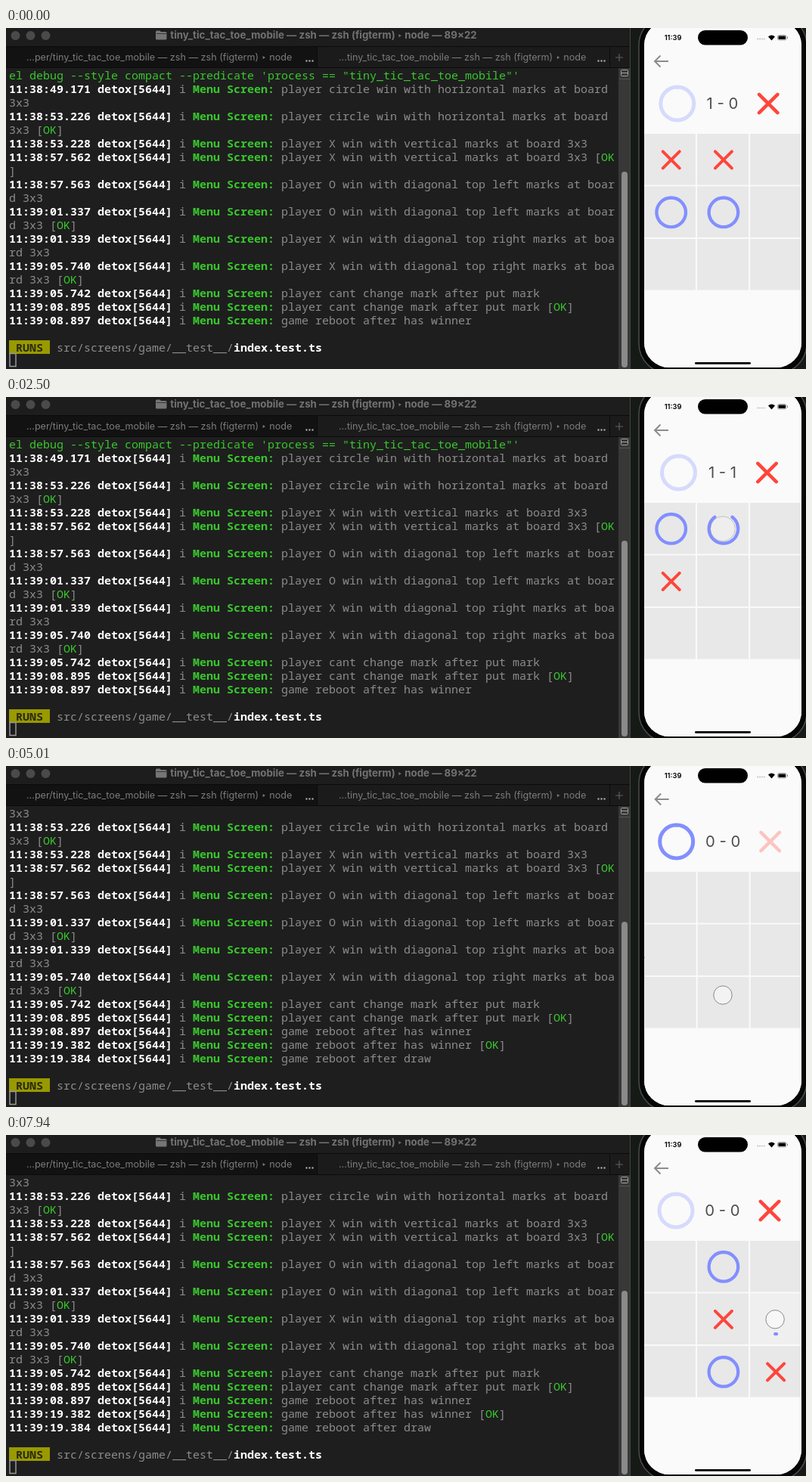
Animation, 1058 px wide and 451 px high, one loop 8 s. Source, as an HTML page:

```html
<!DOCTYPE html>
<html lang="en">
<head>
<meta charset="utf-8">
<title>Tic tac toe test run</title>
<style>
  html, body { margin: 0; width: 100%; height: 100%; overflow: hidden; background: #1e1e1e; }
  svg { display: block; width: 1058px; height: 451px; }
  text { font-family: Inter, Roboto, "DejaVu Sans", sans-serif; white-space: pre; }
  .mono text { font: 15px "Noto Sans Mono", "DejaVu Sans Mono", monospace; fill: #8c8c8c; }
  .mono .time { fill: #fff; font-weight: 700; }
  .mono .suite { fill: #39c72d; font-weight: 700; }
  .mono .ok { fill: #39c72d; }
  .tab { font-size: 12.6px; fill: #7c7c7c; }
  .mid { text-anchor: middle; }
  .mark { fill: none; stroke-linecap: round; }
  .O { stroke: #828fff; }
  .X { stroke: #ff453b; }
</style>
</head>
<body>
<svg viewBox="0 0 1058 451">
  <defs>
    <clipPath id="screen"><rect x="844" y="-10" width="208" height="459" rx="33"/></clipPath>
    <clipPath id="rows"><rect y="54" width="810" height="397"/></clipPath>
  </defs>

  <!-- Terminal window -->
  <rect width="825" height="451" fill="#1e1e1e"/>
  <rect width="825" height="25" fill="#1d1d1d"/>
  <g fill="#4a4a4a"><circle cx="12.5" cy="10" r="6"/><circle cx="32.5" cy="10" r="6"/><circle cx="52.5" cy="10" r="6"/></g>
  <path d="M198 5q0-1.500 1.500-1.500h4l1.500 1.500h6q1.500 0 1.500 1.500v7.500q0 1.500-1.500 1.500h-11.500q-1.500 0-1.500-1.500z" fill="#757575"/>
  <path d="M199 7.500h13" stroke="#3a3a3a"/>
  <text class="mid" x="420" y="14" font-size="13.300" font-weight="700" fill="#727272">tiny_tic_tac_toe_mobile — zsh — zsh (figterm) ‣ node — 89×22</text>
  <rect y="25" width="411" height="27" fill="#121212"/>
  <rect x="412" y="25" width="386" height="27" fill="#1b1b1b"/>
  <rect x="799" y="25" width="26" height="27" fill="#1b1b1b"/>
  <path d="M0 24.500H825M0 52.500H825M411.500 25V52M798.500 25V52" stroke="#0b0b0b"/>
  <text class="tab" x="27" y="43">…per/tiny_tic_tac_toe_mobile — zsh — zsh (figterm) ‣ node</text>
  <text class="tab" x="440" y="43">…tiny_tic_tac_toe_mobile — zsh — zsh (figterm) ‣ node</text>
  <path d="M396.500 43.500h10M782.500 43.500h10" stroke="#c4c4c4" stroke-width="2" stroke-dasharray="2 2"/>
  <path d="M806 39h10M811 34v10" stroke="#606060" stroke-width="1.200"/>
  <rect x="810" y="53" width="15" height="398" fill="#383838"/>
  <rect x="813.500" y="55.500" width="9" height="8" rx="1" fill="none" stroke="#a0a0a0"/>
  <path d="M814 59.500h8" stroke="#a0a0a0"/>
  <path d="M811 67.500h14" stroke="#555"/>
  <rect id="thumb" x="814" width="8" rx="4" fill="#8a8a8a"/>
  <g class="mono" clip-path="url(#rows)"><g id="log"></g></g>
  <g class="mono">
    <rect x="4" y="413" width="54" height="18" fill="#999900"/>
    <text x="13" y="428" style="fill:#2a2a10;font-weight:600">RUNS</text>
    <text x="67" y="428">src/screens/game/__test__/<tspan class="time">index.test.ts</tspan></text>
    <rect x="5" y="430.500" width="8" height="17" fill="none" stroke="#9a9a9a" stroke-width="1.500"/>
  </g>

  <!-- Phone -->
  <rect x="825" width="233" height="451" fill="#151a16"/>
  <path d="M825.500 0V451" stroke="#444"/>
  <rect x="837" y="-17" width="222" height="474" rx="40" fill="#050505" stroke="#4b4b4d" stroke-width="1.500"/>
  <g clip-path="url(#screen)">
    <rect x="844" width="208" height="451" fill="#fff"/>
    <g id="menu">
      <rect x="844" width="208" height="451" fill="#fff"/>
      <g fill="#151515">
        <text x="909.500" y="147" font-size="4">Tiny</text>
        <circle cx="920.500" cy="145.700" r="1.500" fill="#f39a3d"/>
        <text x="911" y="161" font-size="12" font-weight="300">TIC</text>
        <text x="912.500" y="178" font-size="15">TAC</text>
        <text x="917" y="203" font-size="29" fill="#333">TOE</text>
        <text x="916" y="202" font-size="29" fill="#fff" stroke="#999" stroke-width=".4">TOE</text>
        <text class="mid" x="947.500" y="235" font-size="9.800">Board Size</text>
        <text class="mid" x="908.500" y="258" font-size="15">[-]</text>
        <text class="mid" x="946.500" y="259" font-size="16">3x3</text>
        <text class="mid" x="986" y="258" font-size="15">[+]</text>
        <text class="mid" x="947.500" y="310" font-size="18.900" font-weight="700" fill="#2c3a2e">PLAY</text>
      </g>
      <rect id="dim" x="844" width="208" height="451"/>
    </g>
    <g id="game">
      <rect x="844" width="208" height="451" fill="#fafafa"/>
      <path d="M876 44H858M865.500 36.500L858 44l7.500 7.500" fill="none" stroke="#8c8c8c" stroke-width="2"/>
      <path id="headO" class="mark O" stroke-width="5"/>
      <path id="headX" class="mark X" stroke-width="4.500"/>
      <text id="score" class="mid" x="947.500" y="107" font-size="20.300" fill="#4c4c4c"></text>
      <g id="board"></g>
      <path id="strike" class="mark" stroke-width="4"/>
    </g>
    <circle id="touch" fill="#fff" fill-opacity=".45" stroke="#888"/>
    <rect x="915" y="3" width="66" height="19.500" rx="9.700" fill="#000"/>
    <text class="mid" x="882" y="16" font-size="9.300" font-weight="600">11:39</text>
    <path d="M993.500 14.500h10" stroke="#b0b0b0" stroke-width="1.500" stroke-dasharray="1.500 1.300"/>
    <path d="M1008 11.500q4.500-4 9 0l-4.500 5z"/>
    <rect x="1020.500" y="9.500" width="11.500" height="6.500" rx="2" fill="none" stroke="#888" stroke-width=".8"/>
    <rect x="1021.500" y="10.500" width="9.500" height="4.500" rx="1"/>
    <path d="M1033.500 11.500v2.500" stroke="#888"/>
    <rect x="911" y="442" width="74" height="2.800" rx="1.400"/>
  </g>
</svg>
<script>
const LOOP = 8000, COLS = 89, CHAR = 9, LINE = 18;
const RELOAD = 4020, MENU = 4380, PUSH = 4500, PUSH_TIME = 600;
const $ = id => document.getElementById(id);
const clamp = x => Math.min(1, Math.max(0, x));
const easeInOut = x => x < .5 ? 2 * x * x : 1 - 2 * (1 - x) ** 2;

function add(parent, tag, attrs) {
  const el = document.createElementNS('http://www.w3.org/2000/svg', tag);
  set(el, attrs);
  return parent.appendChild(el);
}
function set(el, attrs) {
  for (const key in attrs) el.setAttribute(key, attrs[key]);
}
const show = (el, on) => { el.style.display = on ? '' : 'none'; };

// Log: [time, text, passed], wrapped at the terminal width
const names = {
  circle: 'player circle win with horizontal marks at board 3x3',
  vertical: 'player X win with vertical marks at board 3x3',
  left: 'player O win with diagonal top left marks at board 3x3',
  right: 'player X win with diagonal top right marks at board 3x3',
  keep: 'player cant change mark after put mark',
  winner: 'game reboot after has winner',
  draw: 'game reboot after draw'
};
const entries = [
  ['38:49.171', 'circle'], ['38:53.226', 'circle', true],
  ['38:53.228', 'vertical'], ['38:57.562', 'vertical', true],
  ['38:57.563', 'left'], ['39:01.337', 'left', true],
  ['39:01.339', 'right'], ['39:05.740', 'right', true],
  ['39:05.742', 'keep'], ['39:08.895', 'keep', true],
  ['39:08.897', 'winner'], ['39:19.382', 'winner', true], ['39:19.384', 'draw']
];
let row = 0;
function print(parts) {
  const group = add($('log'), 'g', {});
  let col = 0;
  for (let [text, style] of parts) {
    while (text) {
      if (col === COLS) { col = 0; row++; }
      const piece = text.slice(0, COLS - col);
      add(group, 'text', { x: 4 + col * CHAR, y: 68 + row * LINE, class: style }).textContent = piece;
      col += piece.length;
      text = text.slice(piece.length);
    }
  }
  row++;
  return group;
}
print([['el debug --style compact --predicate \'process == "tiny_tic_tac_toe_mobile"\'', 'ok']]);
const printed = entries.map(([time, name, passed]) => print([
  [`11:${time} detox[5644]`, 'time'], [' i ', ''], ['Menu Screen:', 'suite'], [' ' + names[name], ''],
  ...(passed ? [[' [', ''], ['OK', 'ok'], [']', '']] : [])
]));
const lateLines = printed.slice(-2);

// Rounds: moves are [time, row, column, mark]
const rounds = [
  { from: 0, score: '1 - 0', spread: 60.2, win: 180, moves: [
    [-900, 0, 0, 'X'], [-900, 0, 1, 'X'], [-900, 1, 0, 'O'], [-900, 1, 1, 'O'], [180, 0, 2, 'X']] },
  { from: 980, score: '1 - 1', spread: 58.5, win: 3440, moves: [
    [1220, 0, 0, 'O'], [1870, 1, 0, 'X'], [2330, 0, 1, 'O'], [2980, 1, 1, 'X'], [3440, 0, 2, 'O']] },
  { from: RELOAD, score: '0 - 0', spread: 62, moves: [
    [5650, 0, 1, 'O'], [6300, 1, 1, 'X'], [6760, 2, 1, 'O'], [7410, 2, 2, 'X'], [7880, 1, 2, 'O']] }
];
const center = (r, c) => [879.7 + c * 69.2, 174.3 + r * 69.5];
const taps = rounds.flatMap(round => round.moves.map(([time, r, c]) => {
  const [x, y] = center(r, c);
  return { time, x: x - 1, y, hold: 90 };
}));
taps.push({ time: PUSH, x: 948, y: 303, hold: 720 });

const cells = [];
for (let i = 0; i < 9; i++) {
  const r = Math.floor(i / 3), c = i % 3;
  const rect = add($('board'), 'rect', {
    x: 844 + c * 70, y: 140 + r * 69.5, width: 68, height: 67.5, fill: '#e8e8e8' });
  cells.push({ rect, mark: add($('board'), 'path', {}) });
}

// Circles grow both ways from the bottom, crosses from the middle
function markPath(kind, x, y, size, p) {
  if (kind === 'X') {
    const d = size * p;
    return `M${x - d} ${y - d}L${x + d} ${y + d}M${x + d} ${y - d}L${x - d} ${y + d}`;
  }
  const dx = size * Math.sin(Math.PI * p), top = y + size * Math.cos(Math.PI * p);
  const arc = `A${size} ${size} 0 0 0 `;
  return `M${x - dx} ${top}${arc}${x} ${y + size}${arc}${x + dx} ${top}`;
}

function drawGame(t) {
  const round = rounds.findLast(item => t >= item.from);
  for (const cell of cells) {
    set(cell.rect, { opacity: 1 });
    set(cell.mark, { d: '' });
  }
  let turn = 'O';
  for (const [time, r, c, kind] of round.moves) {
    const age = t - time;
    if (age < 50) continue;
    const cell = cells[r * 3 + c], [x, y] = center(r, c);
    set(cell.rect, { opacity: .6 + .4 * clamp((age - 70) / 160) });
    turn = kind === 'O' ? 'X' : 'O';
    const p = easeInOut(clamp((age - 45) / 185));
    set(cell.mark, {
      d: markPath(kind, x, y, kind === 'O' ? 19.3 : 11, p),
      class: 'mark ' + kind, 'stroke-width': kind === 'O' ? 4.3 : 4 });
  }
  set($('headO'), { d: markPath('O', 948 - round.spread, 100, 22, 1), opacity: turn === 'O' ? 1 : .3 });
  set($('headX'), { d: markPath('X', 948 + round.spread, 100, 12.2, 1), opacity: turn === 'X' ? 1 : .3 });
  $('score').textContent = round.score;

  const struck = round.win ? clamp((t - round.win - 290) / 450) : 0;
  show($('strike'), struck > 0);
  const winner = round.moves[round.moves.length - 1][3];
  set($('strike'), { d: `M855 174.300H${855 + 186 * easeInOut(struck)}`, class: 'mark ' + winner });
}

function drawTouch(t) {
  const tap = taps.find(({ time, hold }) => t >= time && t < time + hold + 140);
  show($('touch'), tap);
  if (!tap) return;
  const fade = clamp((t - tap.time - tap.hold) / 140);
  set($('touch'), { cx: tap.x, cy: tap.y, r: 12.2 + 7.3 * fade, opacity: 1 - fade });
}

function render(t) {
  const reloaded = t >= RELOAD;
  set($('log'), { transform: `translate(0 ${reloaded ? -2 * LINE : 0})` });
  lateLines.forEach(line => show(line, reloaded));
  const top = reloaded ? 206 : 190;
  set($('thumb'), { y: top, height: 449 - top });

  const push = 1 - (1 - clamp((t - PUSH) / PUSH_TIME)) ** 3;
  show($('menu'), t >= MENU && push < 1);
  set($('menu'), { transform: `translate(${-62 * push} 0)` });
  set($('dim'), { opacity: .1 * push });
  show($('game'), !reloaded || t >= PUSH);
  set($('game'), { transform: `translate(${reloaded ? 208 * (1 - push) : 0} 0)` });
  drawGame(t);
  drawTouch(t);
}

const start = performance.now();
function tick() {
  render((performance.now() - start) % LOOP);
  requestAnimationFrame(tick);
}
tick();
</script>
</body>
</html>
```
